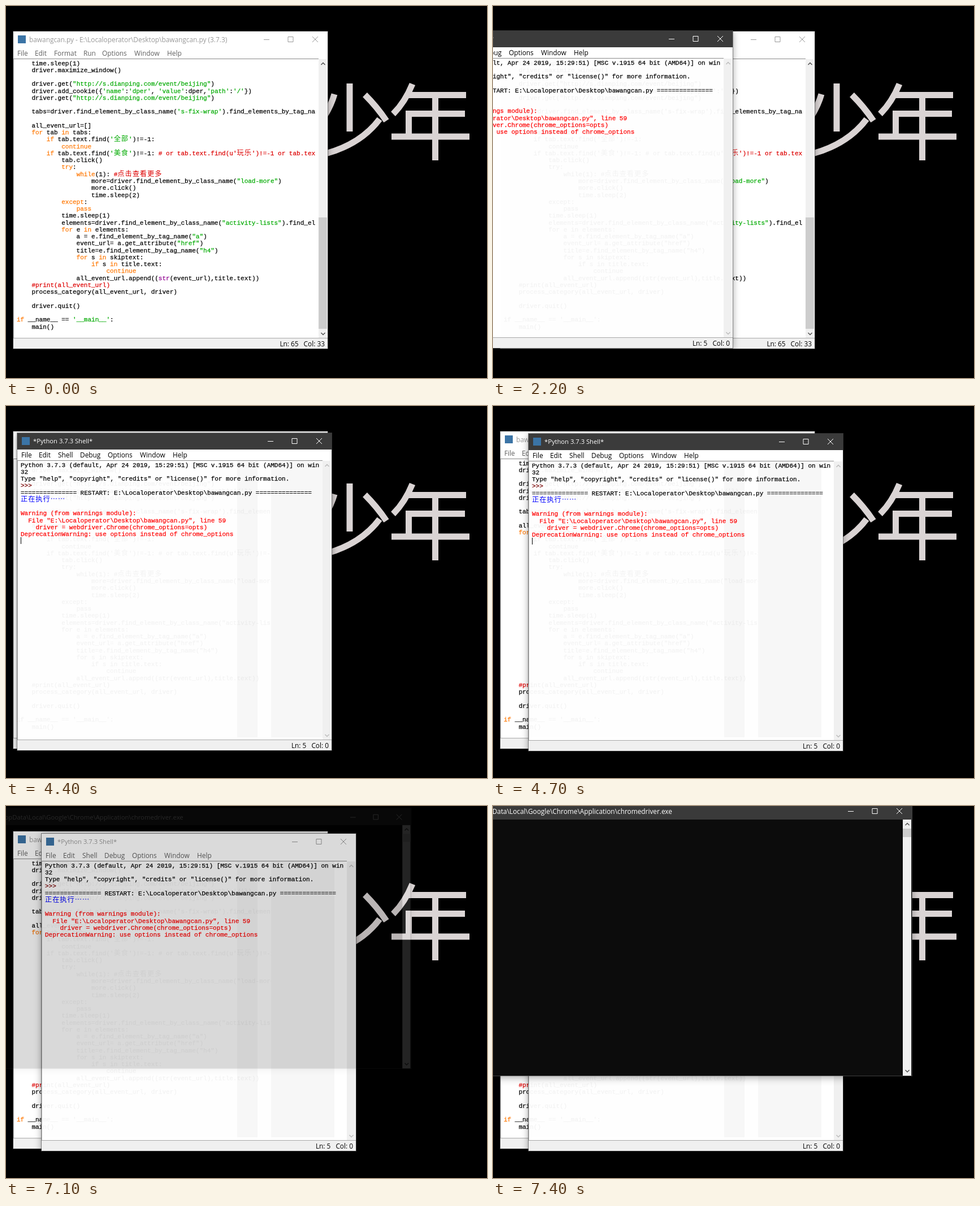
Write an HTML page that moves like this. It is 851 by 658 pixels and loops after 8 s.

```html
<!DOCTYPE html>
<html lang="zh-CN">
<head>
<meta charset="utf-8">
<title>Run Module</title>
<style>
html, body { margin: 0; width: 100%; height: 100%; overflow: hidden; background: #000; }
body { position: relative; font: 11.85px/18px "Open Sans", "Noto Sans", sans-serif; color: #000; }
body *, .menu span { position: absolute; white-space: pre; }
b, i, em, u, kbd, .zh, var { position: static !important; font: inherit; text-decoration: none; }
svg { overflow: visible; fill: none; stroke: currentColor; }
.anim { animation: 8s step-end infinite; }

/* windows */
.win { width: 556px; height: 561px; background: #fff;
  box-shadow: 0 0 0 1px rgba(80, 80, 80, .65), 0 2px 12px rgba(0, 0, 0, .4);
  --bar: #fff; --ink: #999; --text: #606060; }
.bar { inset: 0 0 auto; height: 28.5px; background: var(--bar); color: var(--ink); }
.bar span { left: 28px; top: 5px; }
.icon { left: 8px; top: 7px; width: 14px; height: 14px; background: #3b74a6; }
.menu { top: 28.5px; left: 0; color: var(--text); }
.menu span { top: 0; }
.page { left: 0; top: 48px; width: 540px; height: 494px; box-sizing: border-box; overflow: hidden;
  border: solid #8a8a8a; border-width: 1px 0 0 1px; border-left-color: #bbb; }
.scroll { left: 540px; top: 48.5px; width: 15px; height: 493.5px; background: #f0f0f0; color: #505050; }
.thumb { left: 0; width: 15px; background: #cdcdcd; }
.status { left: 0; right: 0; top: 542px; height: 18px; border-top: 1px solid #a8a8a8; background: #f0f0f0; }
.status span { right: 5px; top: 0; }
.status var { margin-left: 9px; }
pre { margin: 0; left: 5px; top: 1.5px; font: 11px/12.27px "Liberation Mono", "Noto Sans Mono", monospace;
  -webkit-text-stroke: .25px; }
.zh { font: 12.2px/0 "Noto Sans CJK SC", "Noto Sans CJK", sans-serif; letter-spacing: 1px; -webkit-text-stroke: 0; }
pre b { color: #f70; }
pre i { color: #0a0; }
pre em { color: #d00; }
pre u { color: #900090; }
.caret { width: 1px; height: 12px; background: #000; }

#editor { left: 13px; top: 45px; animation-name: editor-focus; }
#editor .caret { left: 223px; top: 112px; width: 2px; height: 11px; animation-name: editor-caret; }
#run { left: 118px; top: 29px; width: 32px; height: 18px; background: #cce8ff; border: 1px solid #99d1ff; animation-name: menu; }

/* drop-down */
#drop { left: 131px; top: 93px; width: 159px; height: 62px; background: #f2f2f2; border: 1px solid #ccc;
  box-shadow: 4px 4px 3px rgba(0, 0, 0, .45); animation-name: menu; }
#drop div { left: 1px; width: 157px; height: 20px; line-height: 20px; }
#drop span { left: 20px; }
#drop span + span { left: 109px; }
@keyframes menu { 0% { opacity: 0 } 7.5% { opacity: .5 } 8.75% { opacity: 1 } 20% { opacity: 0 } }
@keyframes pick1 { 11.25% { background: #0078d7; color: #fff } 12.5% { background: none; color: #000 } }
@keyframes pick2 { 12.5% { background: #0078d7; color: #fff } 15% { background: none; color: #000 } }
@keyframes pick3 { 15% { background: #0078d7; color: #fff } 20% { background: none; color: #000 } }

/* shell */
#shell { left: 63px; top: 49px; translate: var(--x) var(--y); --x: 0px; --y: 0px;
  animation-name: shell-focus, shell-open, drag; }
#shell .bar span { font-size: 11.2px; }
#shell .scroll { color: #bcbcbc; }
#shell kbd { color: #700; }
#shell i { color: #00f; }
#shell em { color: #f00; }
#shell .wait { left: 6px; top: 184px; animation-name: shell-caret; }
#shell .early { animation-name: early; }
#shell .late { animation-name: late; }
#ghost { left: calc(-50px - var(--x)); top: calc(-4px - var(--y)); width: 567px; height: 492px;
  background: linear-gradient(90deg, #fefefe 395px, #f7f7f7 0 431px, #fefefe 0 455px, #f7f7f7 0); }
#ghost div { width: 455px; height: 492px; overflow: hidden; opacity: .045; }
#ghost pre * { color: #000; }

@keyframes editor-focus {
  0%, 21.25% { --bar: #fff; --ink: #999; --text: #606060 }
  6.25% { --bar: #3b3b3b; --ink: #fff; --text: #000 }
}
@keyframes shell-focus {
  0% { --bar: #3b3b3b; --ink: #fff; --text: #000 }
  88.75% { --bar: #fff; --ink: #999; --text: #606060 }
}
@keyframes editor-caret { 0%, 13.75%, 21.25% { opacity: 0 } 6.25%, 17.5% { opacity: 1 } }
@keyframes shell-caret {
  0%, 65%, 76.25%, 86.25% { opacity: 1 }
  62.5%, 72.5%, 82.5%, 88.75% { opacity: 0 }
}
@keyframes early { 0% { opacity: 1 } 27.5% { opacity: 0 } }
@keyframes late { 0% { opacity: 0 } 27.5% { opacity: 1 } }
@keyframes shell-open {
  0% { opacity: 0; scale: .95 }
  21.25% { opacity: .15; scale: .95 }
  22.5% { opacity: .47; scale: .974 }
  23.75% { opacity: .85; scale: .993 }
  25% { opacity: 1; scale: 1 }
}
@keyframes drag {
  0% { --x: -195px; --y: -5px }
  51.25% { --x: -168px; --y: -4px }
  52.5% { --x: -124px; --y: -3px }
  53.75% { --x: -81px; --y: -2px }
  55% { --x: -43px; --y: -1px }
  56.25% { --x: -18px; --y: 0px }
  57.5% { --x: -5px; --y: 0px }
  58.75% { --x: 0px; --y: 0px }
}

/* console */
#console { left: -238px; top: -7px; width: 979px; height: 484px; background: #0c0c0c; transform-origin: 488px 227px;
  box-shadow: 0 0 0 1px rgba(90, 90, 90, .7), 0 2px 14px rgba(0, 0, 0, .4);
  --bar: #3a3a3a; --ink: #fff; animation-name: console-open; }
#console .bar { height: 31px; }
#console .bar span { left: auto; right: 424px; top: 7px; }
#console .scroll { left: 963px; top: 31px; height: 453px; }
@keyframes console-open {
  0% { opacity: 0; scale: .95 }
  88.75% { opacity: .15; scale: .95 }
  90% { opacity: .47; scale: .974 }
  91.25% { opacity: .85; scale: .993 }
  92.5% { opacity: 1; scale: 1 }
}
</style>
</head>
<body>
<svg width="0" height="0">
  <defs>
    <path id="buttons" d="M-91 .5h10M-48-4.5h9v9h-9zM-5-5l10 10M5-5l-10 10"/>
    <path id="up" stroke-width="1.5" d="M-3.5 2l3.5-3.5l3.5 3.5"/>
    <path id="down" stroke-width="1.5" d="M-3.5-2l3.5 3.5l3.5-3.5"/>
  </defs>
</svg>

<svg width="851" height="658" style="left:0;top:0;color:#dad4d4" stroke-width="11" role="img" aria-label="少年">
  <path d="M608 137V222M581 156Q576 174 564 194M635 157Q656 178 673 203M661 200Q628 244 566 261"/>
  <path d="M719 138Q706 170 685 191M710 157.500H814M707 190.500H812M682 231H820M712.500 186V231M759.500 153V273"/>
</svg>

<div id="editor" class="win anim">
  <div class="bar"><div class="icon"></div><span>bawangcan.py - E:\Localoperator\Desktop\bawangcan.py (3.7.3)</span>
    <svg style="left:534px;top:13.500px" width="1" height="1"><use href="#buttons"/></svg></div>
  <div id="run" class="anim"></div>
  <div class="menu"><span style="left:7px">File</span><span style="left:38px">Edit</span><span style="left:72px">Format</span><span style="left:124px">Run</span><span style="left:157px">Options</span><span style="left:214px">Window</span><span style="left:272px">Help</span></div>
  <div class="page"><pre id="code">    time.sleep(1)
    driver.maximize_window()

    driver.get(<i>"http://s.dianping.com/event/beijing"</i>)
    driver.add_cookie({<i>'name'</i>:<i>'dper'</i>, <i>'value'</i>:dper,<i>'path'</i>:<i>'/'</i>})
    driver.get(<i>"http://s.dianping.com/event/beijing"</i>)

    tabs=driver.find_element_by_class_name(<i>'s-fix-wrap'</i>).find_elements_by_tag_na

    all_event_url=[]
    <b>for</b> tab <b>in</b> tabs:
        <b>if</b> tab.text.find(<i>'<span class="zh">全部</span>'</i>)!=-1:
            <b>continue</b>
        <b>if</b> tab.text.find(<i>'<span class="zh">美食</span>'</i>)!=-1: <em># or tab.text.find(u'<span class="zh">玩乐</span>')!=-1 or tab.tex</em>
            tab.click()
            <b>try</b>:
                <b>while</b>(1): <em>#<span class="zh">点击查看更多</span></em>
                    more=driver.find_element_by_class_name(<i>"load-more"</i>)
                    more.click()
                    time.sleep(2)
            <b>except</b>:
                <b>pass</b>
            time.sleep(1)
            elements=driver.find_element_by_class_name(<i>"activity-lists"</i>).find_el
            <b>for</b> e <b>in</b> elements:
                a = e.find_element_by_tag_name(<i>"a"</i>)
                event_url= a.get_attribute(<i>"href"</i>)
                title=e.find_element_by_tag_name(<i>"h4"</i>)
                <b>for</b> s <b>in</b> skiptext:
                    <b>if</b> s <b>in</b> title.text:
                        <b>continue</b>
                all_event_url.append((<u>str</u>(event_url),title.text))
    <em>#print(all_event_url)</em>
    process_category(all_event_url, driver)

    driver.quit()

<b>if</b> __name__ == <i>'__main__'</i>:
    main()</pre></div>
  <div class="caret anim"></div>
  <div class="scroll"><div class="thumb" style="top:280px;height:197px"></div>
    <svg style="left:7.500px;top:8px" width="1" height="1"><use href="#up"/><use href="#down" y="478"/></svg></div>
  <div class="status"><span>Ln: 65<var>Col: 33</var></span></div>
</div>

<div id="drop" class="anim">
  <div class="anim" style="top:0;animation-name:pick1"><span>Python Shell</span></div>
  <div class="anim" style="top:20px;animation-name:pick2"><span>Check Module</span><span>Alt+X</span></div>
  <div class="anim" style="top:40px;animation-name:pick3"><span>Run Module</span><span>F5</span></div>
</div>

<div id="shell" class="win anim">
  <div class="bar"><div class="icon"></div><span>*Python 3.7.3 Shell*</span>
    <svg style="left:534px;top:13.500px" width="1" height="1"><use href="#buttons"/></svg></div>
  <div class="menu"><span style="left:7px">File</span><span style="left:38px">Edit</span><span style="left:72px">Shell</span><span style="left:111px">Debug</span><span style="left:160px">Options</span><span style="left:217px">Window</span><span style="left:275px">Help</span></div>
  <div class="page"><div id="ghost" aria-hidden="true"><div></div></div><pre>Python 3.7.3 (default, Apr 24 2019, 15:29:51) [MSC v.1915 64 bit (AMD64)] on win
32
Type "help", "copyright", "credits" or "license()" for more information.
<kbd>&gt;&gt;&gt;</kbd>
=============== RESTART: E:\Localoperator\Desktop\bawangcan.py ===============
<i class="zh">正在执行……</i>

<em>Warning (from warnings module):
  File "E:\Localoperator\Desktop\bawangcan.py", line 59
    driver = webdriver.Chrome(chrome_options=opts)
DeprecationWarning: use options instead of chrome_options</em></pre></div>
  <div class="caret wait anim"></div>
  <div class="caret early anim" style="left:520px;top:99px"></div>
  <div class="scroll"><svg style="left:7.500px;top:8px" width="1" height="1"><use href="#up"/><use href="#down" y="478"/></svg></div>
  <div class="status"><span class="early anim">Ln: 4<var>Col: 4</var></span><span class="late anim">Ln: 5<var>Col: 0</var></span></div>
</div>

<div id="console" class="anim">
  <div class="bar"><span>AppData\Local\Google\Chrome\Application\chromedriver.exe</span>
    <svg style="left:957px;top:16px" width="1" height="1"><use href="#buttons"/></svg></div>
  <div class="scroll"><div class="thumb" style="top:16px;height:15px"></div>
    <svg style="left:7.500px;top:8px" width="1" height="1"><use href="#up"/><use href="#down" y="437"/></svg></div>
</div>

<script>
// faint afterimage of the editor text behind the shell
const copy = document.getElementById("code").cloneNode(true);
copy.removeAttribute("id");
document.querySelector("#ghost div").append(copy);
</script>
</body>
</html>
```
